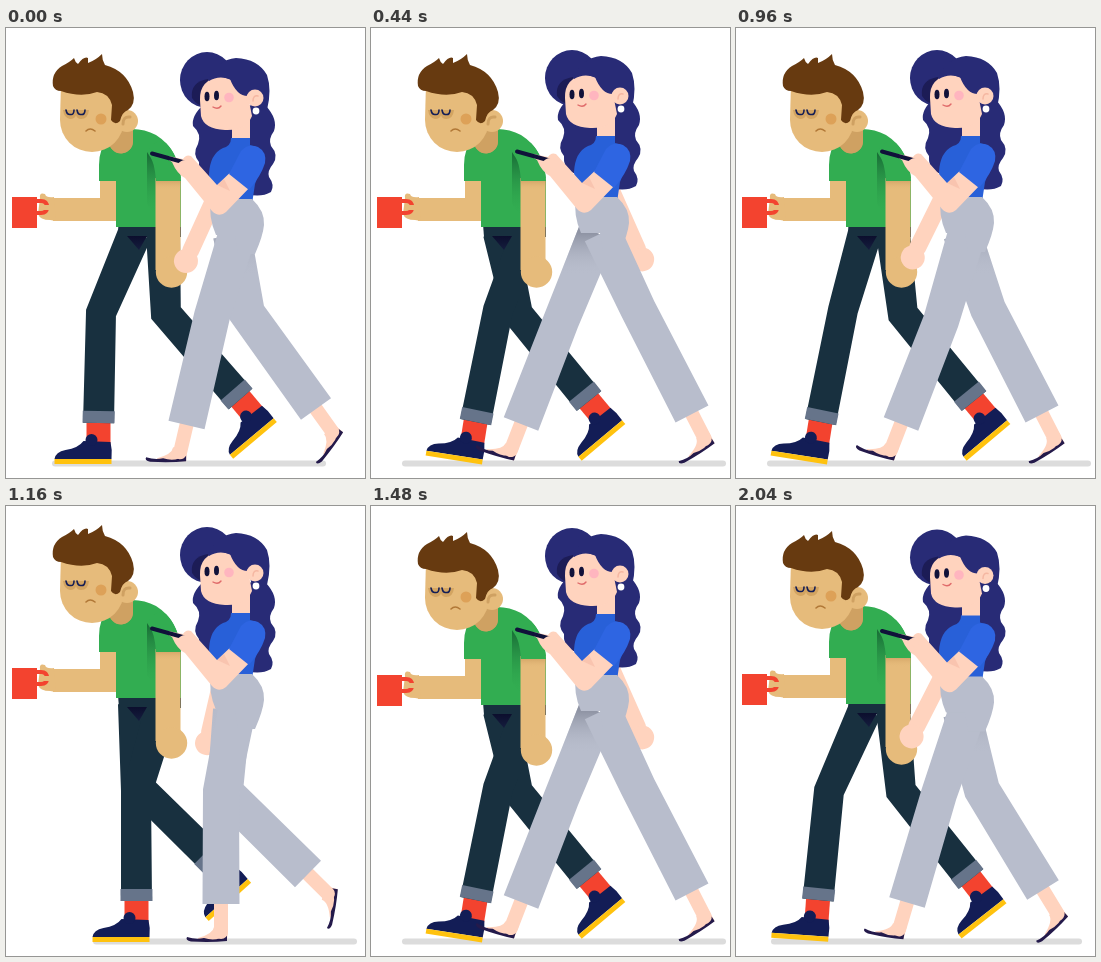
Recreate the animation shown at these times as an HTML page with a canvas. Size 359 px wide and 450 px high, loop 2.08 s.

```html
<!DOCTYPE html>
<html lang="en">
<head>
<meta charset="utf-8">
<title>Morning walk</title>
<style>
  html, body { margin: 0; width: 100%; height: 100%; overflow: hidden; background: #fff; }
  canvas { display: block; width: 359px; height: 450px; }
</style>
</head>
<body>
<canvas id="stage"></canvas>
<script>
const W = 359, H = 450, CYCLE = 1040, STEP = CYCLE / 2, TICK = 40;
const canvas = document.getElementById('stage');
const ctx = canvas.getContext('2d');
const ratio = window.devicePixelRatio || 1;
canvas.width = W * ratio;
canvas.height = H * ratio;

const C = {
  skin: '#e6bb7b', skinDark: '#cfa162', hair: '#673a10', shirt: '#32ad51',
  jeans: '#18303f', cuff: '#66748a', red: '#f3432f', shoe: '#131d56', sole: '#ffc20e',
  pale: '#ffd3be', locks: '#282b76', locksDark: '#1c1c56', top: '#2860d8', sleeve: '#2e65e2',
  slacks: '#b8bdcc', flat: '#241a4b', phone: '#10123a', ground: '#dcdcdc'
};

// Smooth periodic curve through rows of [time, ...values].
function track(period, rows) {
  const n = rows.length;
  const at = i => {
    const turn = Math.floor(i / n), row = rows[i - turn * n];
    return [row[0] + turn * period, ...row.slice(1)];
  };
  const secant = (i, k) => (at(i + 1)[k] - at(i)[k]) / (at(i + 1)[0] - at(i)[0]);
  const slope = (i, k) => {
    const a = secant(i - 1, k), b = secant(i, k);
    return a * b <= 0 ? 0 : 2 * a * b / (a + b);
  };
  return time => {
    const t = (time % period + period) % period;
    let i = n - 1;
    while (rows[i][0] > t) i--;
    const a = at(i), b = at(i + 1), h = b[0] - a[0], u = (t - a[0]) / h;
    return a.slice(1).map((y, j) => {
      const k = j + 1, v = 1 - u;
      return y * v * v * (1 + 2 * u) + b[k] * u * u * (3 - 2 * u)
        + h * u * v * (slope(i, k) * v - slope(i + 1, k) * u);
    });
  };
}

// Columns: time, knee x, knee y, ankle x, ankle y, foot angle.
const manLeg = track(CYCLE, [
  [0, 95, 285, 92.5, 395, 0],
  [120, 130, 285, 130.5, 395, 0],
  [240, 152, 278, 181, 385.5, -13],
  [440, 147, 286, 218, 373, -40],
  [480, 145, 285, 215, 373, -38],
  [520, 140, 285, 214.5, 371, -40],
  [640, 113, 281, 188, 355, -42],
  [760, 100, 274, 126, 383, -23],
  [960, 107, 282, 84.5, 394, 9],
  [1000, 93, 285, 82, 394, 4]
]);
const womanLeg = track(CYCLE, [
  [0, 206, 288, 180.5, 397, 0],
  [120, 215, 285, 215, 398, 0],
  [240, 250, 300, 256.5, 396, -3],
  [440, 267, 281, 321, 386, -32],
  [480, 261, 284, 322, 384, -43],
  [520, 256, 285, 325, 381, -53],
  [640, 234, 286, 317, 368, -80],
  [760, 208, 265, 275, 368, -56],
  [960, 205, 293, 165, 396, 17],
  [1000, 203, 288, 171, 396.5, 10]
]);
// Columns: time, man's bob, woman's bob, loose hair bob, shadow left, shadow right.
const sway = track(STEP, [
  [0, 0, 0, 0, 46, 320],
  [120, -7, -3, -1, 87, 351],
  [240, -12, -10, -13, 81, 306],
  [440, 0, -2, -6, 31, 355],
  [480, -1, -0.5, -2, 35, 346]
]);
const armSwing = track(CYCLE, [[0, 24.5], [120, 13], [440, -24], [760, 12], [1000, 27]]);

const rad = deg => deg * Math.PI / 180;

function fill(d, color) {
  ctx.fillStyle = color;
  ctx.fill(new Path2D(d));
}
function line(d, color, width, cap = 'round') {
  ctx.strokeStyle = color;
  ctx.lineWidth = width;
  ctx.lineCap = cap;
  ctx.lineJoin = 'round';
  ctx.stroke(new Path2D(d));
}
function oval(x, y, rx, color, ry = rx) {
  ctx.fillStyle = color;
  ctx.beginPath();
  ctx.ellipse(x, y, rx, ry, 0, 0, Math.PI * 2);
  ctx.fill();
}
function fade(y0, y1, from, to) {
  const g = ctx.createLinearGradient(0, y0, 0, y1);
  g.addColorStop(0, from);
  g.addColorStop(1, to);
  return g;
}
function placed(x, y, angle, draw) {
  ctx.save();
  ctx.translate(x, y);
  ctx.rotate(rad(angle));
  draw();
  ctx.restore();
}

function direction(a, b) {
  const dx = b[0] - a[0], dy = b[1] - a[1], l = Math.hypot(dx, dy);
  return [dx / l, dy / l];
}

function limb(hip, knee, ankle, widths) {
  const d1 = direction(hip, knee), d2 = direction(knee, ankle);
  const mid = direction([0, 0], [d1[0] + d2[0], d1[1] + d2[1]]);
  const stretch = 1 / (mid[0] * d1[0] + mid[1] * d1[1]);
  const side = (p, d, w) => [p[0] - d[1] * w, p[1] + d[0] * w];
  const edge = s => [
    side(hip, d1, s * widths[0]),
    side(knee, mid, s * widths[1] * stretch),
    side(ankle, d2, s * widths[2])
  ];
  return 'M' + [...edge(1), ...edge(-1).reverse()].map(p => p.join(' ')).join('L') + 'Z';
}

function sneaker() {
  fill('M-12 -9H12V24H-12Z', C.red);
  fill('M-44 36Q-43 29 -33 27Q-20 25 -15 18L12 19Q14 27 13 36Z', C.shoe);
  oval(-7, 17, 6, C.shoe);
  fill('M-44 36H13V41H-44Z', C.sole);
}

function drawManLeg(time, shift, hip) {
  const [kx, ky, ax, ay, angle] = manLeg(time);
  const knee = [kx + shift, ky], ankle = [ax + shift, ay];
  placed(...ankle, angle, sneaker);
  fill(limb(hip, knee, ankle, [17, 15, 15.5]), C.jeans);
  const d = direction(knee, ankle);
  placed(...ankle, Math.atan2(d[1], d[0]) * 180 / Math.PI - 90,
    () => fill('M-16 -12H16V0H-16Z', C.cuff));
}

function manHead() {
  fill('M104 98L127 100V113A12 12 0 0 1 103 114Z', C.skinDark);
  fill('M55 55L112 50L118 92A32 32 0 0 1 54 92Z', C.skin);
  oval(121, 93, 11, C.skin);
  line('M117 96Q117 88 124 89', C.skinDark, 3);
  fill('M47 58Q45 45 56 38Q64 34 68 30Q69 34 72 36Q78 28 82 30L82 35Q90 32 96 26Q96 32 99 37'
    + 'Q121 43 127 64Q130 76 122 82Q116 84 114 93Q109 98 105 92L106 77Q103 65 91 64Q75 70 55 63Q49 63 47 58Z', C.hair);
  fill('M57 82H83Q82 91 75 91Q71 91 70 87Q69 91 64 91Q58 90 57 82Z', '#d3a461');
  line('M60 82Q61 87 64.500 86.500Q68 87 68 82M71 82Q72 87 75 86.500Q79 87 79 82', C.shoe, 1.6);
  oval(95, 91, 5.5, '#dda158');
  line('M80 103Q84 99 89 103', '#b17837', 1.6);
}

function manTorso() {
  // far arm with the mug
  fill('M94 150H110V193H47V170H94Z', C.skin);
  fill('M48 169Q40 170 39 166Q33 164 34 170L32 186Q34 192 44 192L50 193Z', C.skin);
  fill('M6 169H31V200H6Z', C.red);
  line('M31 173H35Q41 173 41 179Q41 185 35 185H31', C.red, 4, 'butt');
  fill('M37 177H47V182H37Z', C.skin);

  fill('M104 106Q93 120 93 137V153H110V199H175V150Q172 121 150 107Q139 101 126 101'
    + 'Q129 112 122 122Q109 124 104 106Z', C.shirt);
  fill('M103 104L127 100V113A12 12 0 0 1 104 118Z', C.skinDark);
  fill('M141 124L150 138V189L141 176Z', fade(124, 189, '#176a35', 'rgba(50,173,81,0)'));

  // near arm
  line('M162 150V242', C.skin, 25, 'butt');
  oval(165.5, 244, 15.7, C.skin);
  fill('M150 152H175V162H150Z', fade(152, 162, 'rgba(190,140,80,.5)', 'rgba(230,187,123,0)'));
  fill('M142 123Q149 110 160 115Q173 128 175 153H150Q149 135 142 123Z', C.shirt);
}

function drawMan(time, bob) {
  const hipY = 205 + bob;
  drawManLeg(time, 0, [129, hipY]);
  drawManLeg(time + STEP, 20, [157, hipY]);
  placed(0, bob, 0, () => {
    fill('M112 196H175V209H113Z', C.jeans);
    fill('M121 208H141L133 222Z', fade(207, 224, '#0b0d2c', '#161f40'));
    manTorso();
    manHead();
  });
}

function slipper() {
  fill('M-7 -5Q-8 2 -23 6V9H6L7 -4Z', C.pale);
  fill('M-34 5Q-25 8 -17 6Q-5 10 6 3V9Q-10 10.500 -30 9.500Q-36 8 -34 5Z', C.flat);
}

function drawWomanLeg(time, shift, hip) {
  const [kx, ky, ax, ay, angle] = womanLeg(time);
  const knee = [kx + shift, ky], ankle = [ax + shift, ay];
  const d = direction(knee, ankle);
  const heel = [ankle[0] + d[0] * 28, ankle[1] + d[1] * 28];
  placed(...heel, angle, slipper);
  line(`M${ankle[0] - d[0] * 5} ${ankle[1] - d[1] * 5}L${heel}`, C.pale, 14);
  const shape = limb(hip, knee, ankle, [19, 18, 18.5]);
  fill(shape, C.slacks);
  return { shape, knee };
}

function womanHead() {
  oval(201, 52, 27, C.locks, 28);
  fill('M186 70Q184 54 202 51L206 76Q194 82 186 70Z', C.locksDark);
  fill('M226 85H244V116H226Z', C.pale);
  fill('M194 72Q193 52 215 48L240 58L246 88Q240 103 219 102Q198 101 195 88Z', C.pale);
  fill('M203 50Q211 32 230 30Q252 31 261 47Q266 62 261 82L246 84L243 68Q231 69 224 51Q212 47 203 53Z', C.locks);
  oval(249, 70, 8.5, C.pale);
  line('M247 73Q247 67 252 68', '#f5b7a2', 1.5);
  oval(250, 83, 3.4, '#fff');
  oval(201, 68.5, 2.5, '#11123a', 4.8);
  oval(210.5, 67.5, 2.5, '#11123a', 4.8);
  oval(223, 69.5, 4.8, '#ffb5bf');
  line('M207 79Q212 82 215 78', '#e06a6a', 1.4);
}

function looseHair() {
  fill('M198 76Q185 88 187 98Q196 106 192 116Q186 126 193 134Q192 145 200 150L240 166'
    + 'Q255 170 265 164Q269 157 263 149Q261 143 267 136Q273 127 265 118Q262 111 268 103Q272 91 260 78Z', C.locks);
}

function nearArm() {
  fill('M166 134Q160 131 162 128L177 131Q180 126 185 128L211 157L229 140L247 156L220 184Q213 190 206 183L179 150Q171 146 166 134Z', C.pale);
  fill('M211 157L218 151L224 163Z', 'rgba(238,170,150,.35)');
  fill('M235 123Q242 115 252 119Q261 124 259 135Q255 148 243 162L223 146Z', C.sleeve);
  line('M146 125.500L178.500 134.500', C.phone, 4);
  fill('M171 137Q176 130 184 133L181 143Z', C.pale);
}

function farArm(time, bob) {
  placed(226, 132 + bob, armSwing(time)[0], () => {
    line('M0 0V100', C.pale, 17);
    oval(0, 111, 12, C.pale);
  });
}

function drawWoman(time, bob, hairBob) {
  farArm(time, bob);
  placed(0, hairBob, 0, looseHair);
  placed(0, bob, 0, () => {
    fill('M225 110H244V117Q258 120 258 132L249 156L246 176H205L203 146Q204 126 217 120Q225 118 225 110Z', C.top);
  });

  const hipY = 207 + bob;
  const far = drawWomanLeg(time + STEP, -15, [226, hipY]);
  const nearKnee = womanLeg(time)[0];
  const spread = Math.min(1, Math.abs(nearKnee - far.knee[0]) / 75);
  ctx.globalAlpha = spread;
  fill(far.shape, fade(hipY, hipY + 42, '#8f94a4', 'rgba(184,189,204,0)'));
  ctx.globalAlpha = 1;
  drawWomanLeg(time, 0, [231, hipY]);

  placed(0, bob, 0, () => {
    fill('M205 171H246Q259 183 258 197Q257 208 249 226H232L229 207H210Q202 189 205 171Z', C.slacks);
    womanHead();
    fill('M225 110H244V120H225Z', C.top);
    nearArm();
  });
}

function render(now) {
  const time = Math.floor(now / TICK) * TICK % (2 * CYCLE);
  const [manBob, womanBob, hairBob, left, right] = sway(time);
  ctx.setTransform(ratio, 0, 0, ratio, 0, 0);
  ctx.fillStyle = '#fff';
  ctx.fillRect(0, 0, W, H);
  line(`M${left + 3} 435.500H${right - 3}`, C.ground, 6);
  drawMan(time, manBob);
  drawWoman(time, womanBob, hairBob);
}

function loop() {
  render(performance.now());
  requestAnimationFrame(loop);
}
loop();
</script>
</body>
</html>
```
